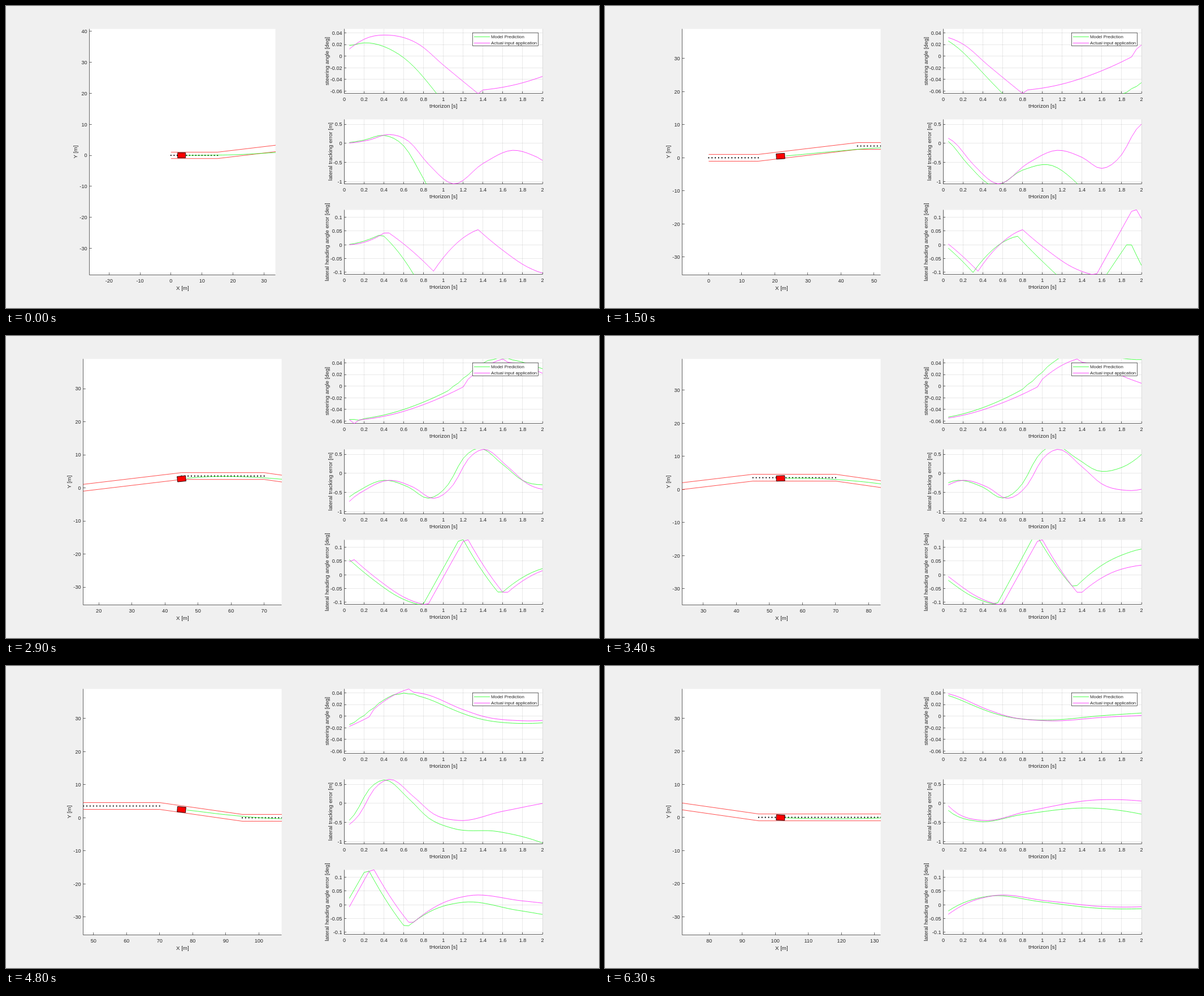
Write an HTML page with a canvas that moves like this. It is 1049x534 px and loops after 6.4 s.

```html
<!DOCTYPE html>
<html>
<head>
<meta charset="utf-8">
<style>
  html, body { margin: 0; width: 100%; height: 100%; overflow: hidden; background: #f0f0f0; }
  canvas { display: block; }
</style>
</head>
<body>
<canvas id="stage" width="1049" height="534"></canvas>
<script>
const ctx = document.getElementById('stage').getContext('2d');
const INK = '#262626', GREEN = '#00ff00', MAGENTA = '#ff00ff', RED = '#ff0000';
const DT = 0.05, HORIZON = 2;

const range = (count, f) => Array.from({ length: count }, (_, i) => f(i));
const lerp = (a, b, s) => a + (b - a) * s;

// Smooth curve through [x, y, x, y, ...]; tangents come from local parabolas.
function smoothArc(flat) {
  const xs = flat.filter((_, i) => i % 2 === 0), ys = flat.filter((_, i) => i % 2);
  const last = xs.length - 1;
  const gaps = range(last, i => xs[i + 1] - xs[i]);
  const slopes = range(last, i => (ys[i + 1] - ys[i]) / gaps[i]);
  const inner = i => (slopes[i - 1] * gaps[i] + slopes[i] * gaps[i - 1]) / (gaps[i - 1] + gaps[i]);
  const tangent = i => {
    if (last === 1) return slopes[0];
    if (i === 0) return 2 * slopes[0] - inner(1);
    if (i === last) return 2 * slopes[last - 1] - inner(last - 1);
    return inner(i);
  };
  return x => {
    let i = 0;
    while (i < last - 1 && xs[i + 1] < x) i++;
    const s = (x - xs[i]) / gaps[i], r = 1 - s;
    return ys[i] * (1 + 2 * s) * r * r + ys[i + 1] * s * s * (3 - 2 * s)
      + gaps[i] * s * r * (tangent(i) * r - tangent(i + 1) * s);
  };
}

// Arcs joined by sharp corners; each starts where the previous one ends.
function chain(arcs) {
  const parts = arcs.map((arc, i) => {
    const points = i ? [...arcs[i - 1].slice(-2), ...arc] : arc;
    return { end: points[points.length - 2], at: smoothArc(points) };
  });
  return x => (parts.find(p => x <= p.end + 1e-9) || parts[parts.length - 1]).at(x);
}

// Steps between which the drift of the prediction changes evenly.
const DRIFT_STEPS = [0, 11, 20, 30, 44, 52, 59];

// drift: [deviation at the end of the horizon, power of its growth]
const plots = [
  {
    top: 40.5, zero: 88.6, scale: 1.03, labelX: 571, label: 'steering angle [deg]',
    ticks: [.04, .02, 0, -.02, -.04, -.06], unit: 1e-3, blur: .1,
    actual: [
      [.05, 12, .2, 29, .45, 36, .75, 20.5, 1, -15.5, 1.35, -64.3],
      [1.4, -58],
      [1.75, -48, 2.1, -28.5, 2.45, -1.4],
      [2.5, 12],
      [2.7, 36, 2.85, 46.5],
      [2.9, 41],
      [3, 38.3, 3.4, 11, 3.6, -.4, 4, -8, 4.6, -1.7, 5, 1.3]],
    drift: [[-130, 1.2], [-70, 1], [-20, 3], [43, 2.5], [-5, .5], [-24, .6], [4, 2]]
  },
  {
    top: 200.5, zero: 242.7, scale: .674, labelX: 576.5, label: 'lateral tracking error [m]',
    ticks: [.5, 0, -.5, -1], unit: .01, blur: 0,
    actual: [
      [.05, .5, .25, 8.5, .45, 23, .65, 5, .85, -55, 1.1, -106.5, 1.4, -53, 1.7, -18.5, 1.95, -37,
        2.15, -66, 2.35, -30, 2.5, 37, 2.65, 62.6, 2.9, 17, 3.1, -28, 3.35, -45, 3.8, -21, 4.5, 8.8, 5, 4.3]],
    drift: [[-1500, 4], [-190, 2.6], [-61, 4], [88, 3.6], [-106, 2.7], [-508, 4.5], [-33, 1.5]]
  },
  {
    top: 360.5, zero: 422.2, scale: .487, labelX: 571, label: 'lateral heading angle error [deg]',
    ticks: [.1, .05, 0, -.05, -.1], unit: 1e-3, blur: 0,
    actual: [
      [.05, 0, .25, 15, .4, 42.5],
      [.45, 43],
      [.65, -12, .9, -96],
      [1.1, -6, 1.35, 55],
      [1.6, -20, 1.85, -81, 2.05, -108],
      [2.1, -105],
      [2.45, 121.5],
      [2.5, 127],
      [2.6, 65, 2.85, -63.5],
      [2.9, -63.5],
      [3.15, -1, 3.45, 32.5, 4, 14, 4.6, -7, 5, -6.3]],
    drift: [[-1500, 3], [-140, 1.8], [-54, 4.5], [58, 2.2], [-39, 1], [-165, 2], [-8, 1]]
  }
];

// The prediction runs one sample ahead of the actual curve and drifts off along the horizon.
for (const p of plots) {
  p.curve = chain(p.actual);
  p.prediction = (step, t) => {
    const time = step * DT + t + DT;
    const base = [-p.blur, 0, p.blur].reduce((sum, d) => sum + p.curve(Math.max(DT, time + d)), 0) / 3;
    let k = 0;
    while (DRIFT_STEPS[k + 1] < step) k++;
    const mix = (step - DRIFT_STEPS[k]) / (DRIFT_STEPS[k + 1] - DRIFT_STEPS[k]);
    const [end, power] = p.drift[k].map((v, i) => lerp(v, p.drift[k + 1][i], mix));
    return base + end * (t / HORIZON) ** power;
  };
}

function line(points, color, width = .7) {
  ctx.strokeStyle = color;
  ctx.lineWidth = width;
  ctx.beginPath();
  points.forEach(([x, y]) => ctx.lineTo(x, y));
  ctx.stroke();
}

const crisp = v => Math.floor(v) + .5;

function text(str, x, y, size, align) {
  ctx.font = size + 'px "Liberation Sans", Arial, sans-serif';
  ctx.textAlign = align;
  ctx.fillStyle = INK;
  ctx.fillText(str, x, y);
}

function sideText(str, x, y) {
  ctx.save();
  ctx.translate(x, y);
  ctx.rotate(-Math.PI / 2);
  text(str, 0, 0, 9.75, 'center');
  ctx.restore();
}

// White panel with left and bottom axes; ticks are [position, label] pairs.
function panel(x, y, w, h, xTicks, yTicks, tickLength, grid, drawData) {
  const bottom = y + h;
  ctx.fillStyle = '#fff';
  ctx.fillRect(x, y, w, h);
  if (grid) {
    const pale = 'rgba(38,38,38,.15)';
    xTicks.forEach(([px]) => line([[crisp(px), y], [crisp(px), bottom]], pale));
    yTicks.forEach(([py]) => line([[x, crisp(py)], [x + w, crisp(py)]], pale));
  }
  line([[x, y], [x, bottom], [x + w, bottom]], INK);
  xTicks.forEach(([px, label]) => {
    line([[crisp(px), bottom], [crisp(px), bottom - tickLength]], INK);
    text(label, px, bottom + 13, 9.1, 'center');
  });
  yTicks.forEach(([py, label]) => {
    line([[x, crisp(py)], [x + tickLength, crisp(py)]], INK);
    text(label, x - 4, py + 3.4, 9.1, 'right');
  });
  ctx.save();
  ctx.beginPath();
  ctx.rect(x, y - .5, w + .5, h + 1);
  ctx.clip();
  drawData();
  ctx.restore();
}

function drawPlot(p, step) {
  const left = 598.5, width = 350.5, height = 114;
  const toX = t => left + t * width / HORIZON;
  const toY = v => p.zero - v * p.scale;
  const times = range(40, i => (i + 1) * DT);
  const xTicks = range(11, i => [toX(i / 5), String(i / 5)]);
  const yTicks = p.ticks.map(v => [toY(v / p.unit), String(v)]);
  panel(left, p.top, width, height, xTicks, yTicks, 3.5, true, () => {
    line(times.map(t => [toX(t), toY(p.prediction(step, t))]), GREEN);
    line(times.map(t => [toX(t), toY(p.curve(step * DT + t))]), MAGENTA);
  });
  text('tHorizon [s]', left + width / 2, p.top + height + 25.5, 9.75, 'center');
  sideText(p.label, p.labelX, p.top + height / 2);
}

function drawLegend() {
  ctx.fillStyle = '#fff';
  ctx.fillRect(825.5, 47.5, 116, 23);
  ctx.strokeStyle = INK;
  ctx.lineWidth = .7;
  ctx.strokeRect(825.5, 47.5, 116, 23);
  [['Model Prediction', GREEN], ['Actual input application', MAGENTA]].forEach(([label, color], i) => {
    const y = 54.5 + 11 * i;
    line([[828, y], [856, y]], color);
    text(label, 858, y + 2.7, 7.9, 'left');
  });
}

// Lane change and return, in metres.
const SHIFT = 3.57, HALF_LANE = 1.03, SPEED = 1.664;
const BENDS = [0, 15, 45, 70, 95, 200];
const lane = chain([[0, 0, 15, 0], [45, SHIFT], [70, SHIFT], [95, 0], [200, 0]]);
const isStraight = x => x <= 15 || (x >= 45 && x <= 70) || x >= 95;
const carY = smoothArc([0, 0, 4, .03, 11, .48, 20, 1.88, 30, 3.37, 35, 3.4, 44, 2.5, 52, .95,
  59, -.06, 68, -.42, 78, -.15]);

function drawRoad(step) {
  const left = step ? 136.5 : 147.5, width = step ? 351 : 329, top = 40.5, height = 435;
  const scale = width / 60, middle = top + height / 2;
  const centerX = 3.67 + SPEED * step, from = centerX - 30, to = centerX + 30;
  const visible = [Math.max(from, 0), to, ...BENDS.filter(x => x > from && x < to)].map(lane);
  const centerY = (Math.max(...visible) + Math.min(...visible)) / 2;
  const toX = x => left + (x - from) * scale;
  const toY = y => middle - (y - centerY) * scale;

  const tens = range(20, i => (i - 4) * 10);
  const xTicks = tens.filter(v => v >= from && v <= to).map(v => [toX(v), String(v)]);
  const yTicks = tens.filter(v => Math.abs(v - centerY) <= height / 2 / scale).map(v => [toY(v), String(v)]);

  panel(left, top, width, height, xTicks, yTicks, 4.3, false, () => {
    [HALF_LANE, -HALF_LANE].forEach(side => line(BENDS.map(x => [toX(x), toY(lane(x) + side)]), RED));

    ctx.fillStyle = '#000';
    range(140, x => x).filter(isStraight).forEach(x => {
      ctx.beginPath();
      ctx.arc(toX(x), toY(lane(x)), 1.1, 0, 7);
      ctx.fill();
    });

    const carX = centerX - .25, drift = -.75 * Math.max(0, 1 - step / 20);
    line(range(19, i => [toX(carX + (i + 1) * SPEED), toY(carY(step + i + 1) + drift * (i / 18) ** 2)]), GREEN);

    ctx.save();
    ctx.translate(toX(carX), toY(carY(step)));
    ctx.rotate(-Math.atan2(carY(step + 1) - carY(Math.max(0, step - 1)), 2 * SPEED));
    ctx.fillStyle = RED;
    ctx.strokeStyle = '#000';
    ctx.lineWidth = .8;
    ctx.beginPath();
    ctx.rect(-1.28 * scale, -.82 * scale, 2.56 * scale, 1.64 * scale);
    ctx.fill();
    ctx.stroke();
    ctx.restore();
  });
  text('X [m]', 312.3, 502, 9.75, 'center');
  sideText('Y [m]', left - 22, middle);
}

function frame() {
  const time = performance.now() % 6400;
  const step = time < 500 ? 0 : Math.floor((time - 500) / 100) + 1;
  ctx.fillStyle = '#f0f0f0';
  ctx.fillRect(0, 0, 1049, 534);
  drawRoad(step);
  plots.forEach(p => drawPlot(p, step));
  drawLegend();
  requestAnimationFrame(frame);
}
frame();
</script>
</body>
</html>
```
